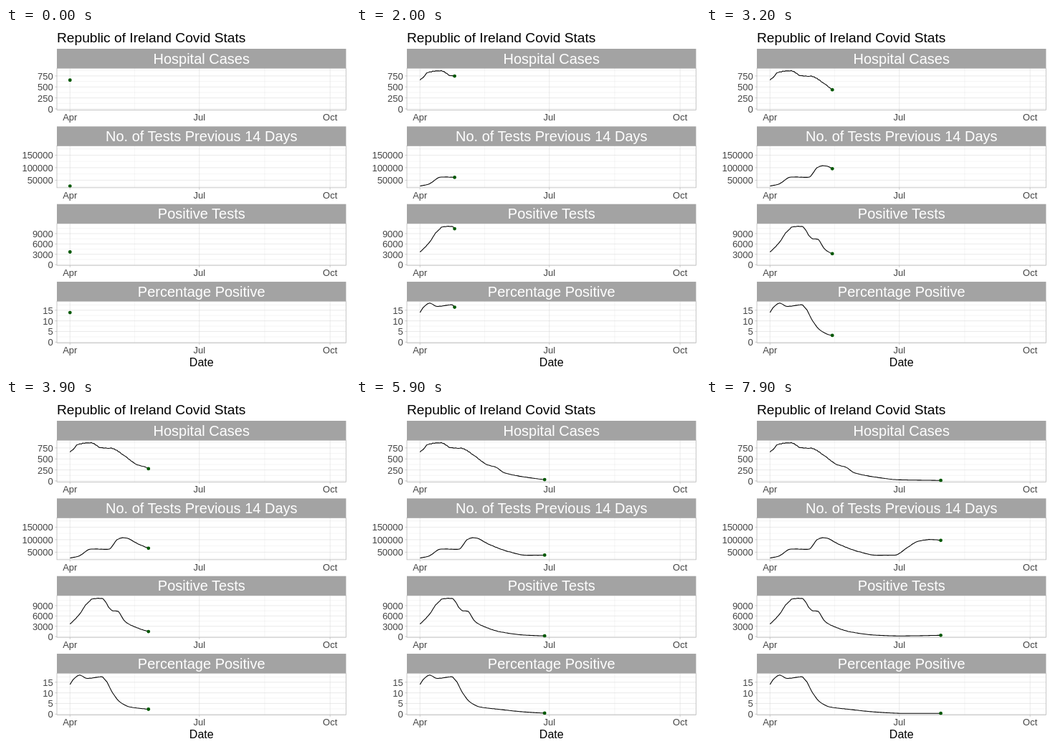
Write an HTML page that moves like this. It is 480 px wide and 480 px high and loops after 8000 ms.

```html
<!DOCTYPE html>
<html lang="en">
<head>
<meta charset="utf-8">
<title>Covid Stats</title>
<style>
  html, body { margin: 0; height: 100%; overflow: hidden; background: #fff; }
  svg { display: block; width: 100vw; height: 100vh; font-family: "Liberation Sans", Arial, Helvetica, sans-serif; }
</style>
</head>
<body>
<svg id="stage" viewBox="0 0 480 480"></svg>
<script>
const LEFT = 71, RIGHT = 474.5, MID = (LEFT + RIGHT) / 2;
const PITCH = 108.35, STRIP_TOP = 29, STRIP_H = 27.2, PANEL_H = 58.3;
const START_X = 89.3, DAY_W = 1.983, DAYS = 122;
const LOOP = 8000, HOLD = 600, STEP = 100, STEP_W = 3.22;
const GREY = '#a3a3a3', AXIS_TEXT = '#444';

// zero: y of value 0, unit: pixels per value, keys: [day, value], noise: relative daily wobble
const panels = [
  { title: 'Hospital Cases', zero: 112.9, unit: 0.06133, ticks: [0, 250, 500, 750], noise: 0.016,
    keys: [[0, 655], [2, 705], [5, 825], [14, 870], [22, 760], [30, 735], [39, 555],
      [47, 375], [54, 300], [59, 190], [75, 83], [91, 25], [DAYS, 10]] },
  { title: 'No. of Tests Previous 14 Days', zero: 229.8, unit: 0.000349, ticks: [50000, 100000, 150000], noise: 0.008,
    keys: [[0, 26500], [6, 34000], [15, 63000], [27, 61500], [34, 103000], [38, 108000], [49, 80000],
      [62, 53000], [75, 37800], [88, 38500], [96, 66000], [104, 93000], [113, 101000], [DAYS, 96500]] },
  { title: 'Positive Tests', zero: 330.2, unit: 0.00481, ticks: [0, 3000, 6000, 9000], noise: 0.012,
    keys: [[0, 3680], [6, 6100], [13, 10080], [17, 11100], [22, 11150], [30, 7500], [33, 7450],
      [39, 4300], [49, 2300], [57, 1350], [75, 420], [91, 210], [DAYS, 400]] },
  { title: 'Percentage Positive', zero: 438.3, unit: 2.967, ticks: [0, 5, 10, 15], noise: 0.006,
    keys: [[0, 13.9], [3, 16.8], [7, 18.3], [12, 16.8], [22, 17.6], [25, 16], [30, 10],
      [35, 5.8], [42, 3.4], [55, 2.3], [75, 0.95], [95, 0.35], [DAYS, 0.35]] }
];
const months = [['Apr', 0], ['Jul', 91], ['Oct', 183]];

const stage = document.getElementById('stage');
const dayX = day => START_X + day * DAY_W;

function add(tag, attrs) {
  const node = document.createElementNS('http://www.w3.org/2000/svg', tag);
  for (const key in attrs) node.setAttribute(key, attrs[key]);
  return stage.appendChild(node);
}

function label(text, x, y, size, fill, anchor) {
  add('text', { x, y, 'font-size': size, fill, 'text-anchor': anchor }).textContent = text;
}

function line(x1, y1, x2, y2, stroke, width) {
  add('line', { x1, y1, x2, y2, stroke, 'stroke-width': width });
}

// Seeded wobble in -1..1
function wobble(seed) {
  const r = Math.sin(seed * 127.1 + 31.7) * 43758.5453;
  return (r - Math.floor(r)) * 2 - 1;
}

// Monotone cubic through the key points: no overshoot at peaks or plateaus
function smooth(keys) {
  const slopes = keys.slice(1).map(([x, y], i) => (y - keys[i][1]) / (x - keys[i][0]));
  const tangents = keys.map((_, i) => {
    const a = slopes[i - 1] ?? slopes[i], b = slopes[i] ?? a;
    return a * b > 0 ? 2 * a * b / (a + b) : 0;
  });
  return x => {
    const i = Math.max(1, keys.findIndex(k => k[0] >= x));
    const [x0, y0] = keys[i - 1], [x1, y1] = keys[i];
    const w = x1 - x0, u = (x - x0) / w, v = 1 - u;
    return v * v * ((1 + 2 * u) * y0 + u * w * tangents[i - 1])
      + u * u * ((1 + 2 * v) * y1 - v * w * tangents[i]);
  };
}

function buildPanel(panel, i) {
  const stripTop = STRIP_TOP + i * PITCH;
  const top = stripTop + STRIP_H, bottom = top + PANEL_H;
  const valueY = v => panel.zero - v * panel.unit;
  const hLine = (y, w) => line(LEFT, y, RIGHT, y, '#d8d8d8', w);
  const vLine = (x, w) => line(x, top, x, bottom, '#d8d8d8', w);

  const gap = panel.ticks[1] - panel.ticks[0];
  for (let v = panel.ticks[0] - gap / 2; valueY(v) > top; v += gap) {
    if (valueY(v) < bottom) hLine(valueY(v), 0.27);
  }
  vLine(dayX(45.5), 0.27);
  vLine(dayX(137), 0.27);
  panel.ticks.forEach(v => hLine(valueY(v), 0.53));
  months.forEach(m => vLine(dayX(m[1]), 0.53));

  const curve = smooth(panel.keys);
  panel.points = Array.from({ length: DAYS + 1 }, (_, day) => {
    const jitter = day ? panel.noise * wobble(day + i * DAYS) : 0;
    return [dayX(day), valueY(curve(day) * (1 + jitter))];
  });
  panel.path = add('polyline', { fill: 'none', stroke: '#000', 'stroke-width': 1.07 });
  panel.dot = add('circle', { r: 2.4, fill: '#005800' });

  add('rect', { x: LEFT, y: top, width: RIGHT - LEFT, height: PANEL_H,
    fill: 'none', stroke: '#b3b3b3', 'stroke-width': 0.7 });
  add('rect', { x: LEFT, y: stripTop, width: RIGHT - LEFT, height: STRIP_H, fill: GREY });
  label(panel.title, MID, stripTop + 20.75, 20, '#fff', 'middle');

  panel.ticks.forEach(v => {
    line(LEFT - 2.75, valueY(v), LEFT, valueY(v), GREY, 0.53);
    label(v, LEFT - 5.2, valueY(v) + 5, 13, AXIS_TEXT, 'end');
  });
  months.forEach(([name, day]) => {
    line(dayX(day), bottom, dayX(day), bottom + 2.75, GREY, 0.53);
    label(name, dayX(day), bottom + 14.8, 13, AXIS_TEXT, 'middle');
  });
}

// Part of the line up to x, ending on an interpolated point
function reveal(points, x) {
  const n = points.findIndex(p => p[0] >= x);
  if (n < 1) return [points[0]];
  const [x0, y0] = points[n - 1], [x1, y1] = points[n];
  return [...points.slice(0, n), [x, y0 + (y1 - y0) * (x - x0) / (x1 - x0)]];
}

function render(ms) {
  const t = ms % LOOP;
  const steps = t < HOLD ? 0 : Math.floor((t - HOLD) / STEP) + 1;
  for (const panel of panels) {
    const shown = reveal(panel.points, START_X + steps * STEP_W);
    const [x, y] = shown[shown.length - 1];
    panel.path.setAttribute('points', shown.join(' '));
    panel.dot.setAttribute('cx', x);
    panel.dot.setAttribute('cy', y);
  }
}

label('Republic of Ireland Covid Stats', LEFT, 20, 19.2, '#000', 'start');
panels.forEach(buildPanel);
label('Date', MID, 472, 16, '#000', 'middle');

let begin;
function tick(now) {
  begin ??= now;
  render(now - begin);
  requestAnimationFrame(tick);
}
render(0);
requestAnimationFrame(tick);
</script>
</body>
</html>
```
